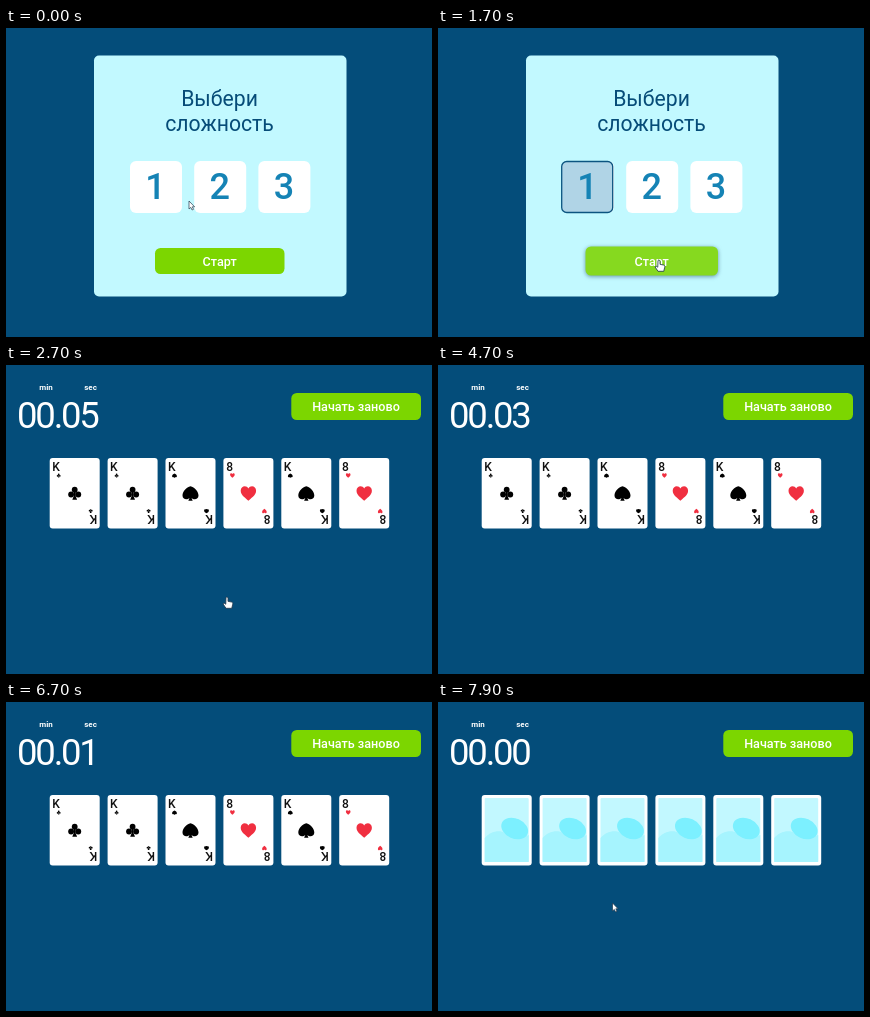
An HTML page that plays this animation: 426x309 px, repeating every 8 s.

```html
<!DOCTYPE html>
<html lang="ru">
<head>
<meta charset="utf-8">
<style>
  html, body { margin: 0; width: 100%; height: 100%; overflow: hidden; background: #044d7a; }
  svg { display: block; width: 100vw; height: 100vh; font-family: Roboto, "Noto Sans", sans-serif; }
  .mid { text-anchor: middle; }
  .num { font-size: 36px; font-weight: 500; fill: #1583b5; }
  .label { font-size: 12.6px; font-weight: 500; fill: #fff; }
  .unit { font-size: 8px; font-weight: 700; fill: #fff; }
  .rank { font-size: 12px; font-weight: 500; }
  .lift { filter: drop-shadow(0 1px 2px #24506e99); }
</style>
</head>
<body>
<svg viewBox="0 0 426 309" preserveAspectRatio="none">
  <defs>
    <path id="heart" d="M0 7.5C-2 5-7.7 2.2-7.7-2.6C-7.7-7.6-1.8-8.6 0-4.7C1.8-8.6 7.7-7.6 7.7-2.6C7.7 2.2 2 5 0 7.5Z" fill="#f02f40"/>
    <path id="spade" d="M0-7C4-5.8 8-2 8 2.2C8 6.4 3.2 7 1 4.6L2.2 7.4H-2.2L-1 4.6C-3.2 7-8 6.4-8 2.2C-8-2-4-5.8 0-7Z"/>
    <g id="club">
      <circle cy="-3.6" r="2.9"/><circle cx="-3.6" cy="1.2" r="2.9"/><circle cx="3.6" cy="1.2" r="2.9"/>
      <path d="M-1-3H1L1 3L2.4 6.4H-2.4L-1 3Z"/>
    </g>
    <g id="back">
      <rect width="50" height="70.5" rx="3" fill="#fff"/>
      <rect x="3" y="3" width="44" height="64" rx="1" fill="#c2f8ff"/>
      <path d="M3 43C8 37 17 34 24 38C31 44 39 44 47 40V67H3Z" fill="#a6f4fe"/>
      <ellipse cx="33" cy="33.5" rx="14" ry="10" transform="rotate(24 33 33.5)" fill="#7cf0ff"/>
    </g>
  </defs>

  <g id="menu">
    <rect x="88" y="27.5" width="252.5" height="241" rx="5" fill="#c2f9ff"/>
    <g class="mid" font-size="21.2" fill="#064c78">
      <text x="213.5" y="78">Выбери</text>
      <text x="213.5" y="103">сложность</text>
    </g>
    <g id="levels"></g>
    <rect id="start" rx="5.5"/>
    <text class="label mid" x="213.7" y="238">Старт</text>
  </g>

  <g id="game">
    <text class="unit mid" x="40" y="25">min</text>
    <text class="unit mid" x="84.5" y="25">sec</text>
    <text id="timer" x="11" y="62.5" font-size="36.5" letter-spacing="-2.2" fill="#fff"></text>
    <rect x="285.3" y="28" width="129.7" height="27" rx="5.5" fill="#7cd600"/>
    <text class="label mid" x="350" y="46">Начать заново</text>
    <g id="faces"></g>
    <g id="backs"></g>
  </g>

  <g id="cursor" fill="#fff" stroke="#23394d" stroke-width=".7" stroke-linejoin="round">
    <path id="arrow" d="M0 0V8L1.8 6.4L3.1 9L4.5 8.3L3.3 5.8H5.6Z"/>
    <path id="hand" transform="scale(1.2)" d="M0 0C.9-.8 1.7 0 1.7 1V3.2L4.7 3.8C5.6 4 5.8 4.7 5.6 5.6L4.8 9H0L-2.4 5.4C-2.2 4.4-1.2 4.6-.2 5.6Z"/>
  </g>
</svg>
<script>
// The picture advances in steps of STEP ms
const LOOP = 8000, STEP = 100, DEAL = 2700, LEAVE = 3700, HIDE = 7600, TURN = 7700;
const $ = id => document.getElementById(id);
const show = (id, on) => $(id).style.display = on ? '' : 'none';
const set = (el, attrs) => { for (const k in attrs) el.setAttribute(k, attrs[k]); };
const clamp = v => Math.max(0, Math.min(1, v));

$('levels').innerHTML = [1, 2, 3].map((n, i) => `
  <rect id="level${n}" x="${124 + 64.2 * i}" y="133" width="52" height="52" rx="6" fill="#fff"/>
  ${i ? '' : '<rect id="pick" fill="#b0d4e6" stroke="#0b5480" stroke-width="1.3"/>'}
  <text class="num mid" x="${149.5 + 64.2 * i}" y="171">${n}</text>`).join('');

const cardX = i => 43.7 + 57.9 * i;

function face([rank, suit], i) {
  const corner = `<text class="rank mid" x="-18.7" y="-22" fill="#111">${rank}</text>
    <use href="#${suit}" transform="translate(-16 -17.8) scale(.3)"/>`;
  return `<g transform="translate(${cardX(i) + 25} 128.3)">
    <rect x="-25" y="-35.3" width="50" height="70.5" rx="3" fill="#fff"/>
    <use href="#${suit}"/>${corner}<g transform="rotate(180)">${corner}</g></g>`;
}

const cards = [['K', 'club'], ['K', 'club'], ['K', 'spade'], ['8', 'heart'], ['K', 'spade'], ['8', 'heart']];
$('faces').innerHTML = cards.map(face).join('');
$('backs').innerHTML = cards.map((_, i) => `<use href="#back" x="${cardX(i)}" y="93"/>`).join('');

// Pointer stops: time, x, y
const path = [[0, 183, 173], [600, 164, 163], [1000, 164, 163], [1700, 220, 232.5], [LOOP, 220, 232.5]];

function pointer(t) {
  if (t >= TURN) return [174.5, 201];
  const i = path.findIndex(p => p[0] > t);
  const [t0, x0, y0] = path[i - 1], [t1, x1, y1] = path[i];
  const k = (t - t0) / (t1 - t0), e = k * k * (3 - 2 * k);
  return [x0 + (x1 - x0) * e, y0 + (y1 - y0) * e];
}

function draw(t) {
  const [x, y] = pointer(t), inMenu = t < DEAL;
  const onLevel = inMenu && x < 176 && y < 185;
  const onStart = inMenu && y > 220;

  show('menu', inMenu);
  show('game', !inMenu);
  show('faces', t < HIDE);
  show('backs', t >= TURN);

  const grow = onLevel ? 1.5 : 0;
  set($('level1'), {
    x: 124 - grow, y: 133 - grow, width: 52 + 2 * grow, height: 52 + 2 * grow,
    class: onLevel ? 'lift' : '', stroke: onLevel ? '#8fb6c8' : 'none'
  });

  const size = 51 * clamp((t - 800) / 146);
  show('pick', size > 0);
  set($('pick'), { x: 149.2 - size / 2, y: 159 - size / 2, width: size, height: size, rx: size / 10 });

  const g = onStart ? 1.5 : 0;
  set($('start'), {
    x: 149 - g, y: 220 - g, width: 129.5 + 2 * g, height: 26 + 2 * g,
    fill: onStart ? '#86d91f' : '#7cd600', class: onStart ? 'lift' : ''
  });

  const left = Math.max(0, Math.min(5, Math.ceil((7570 - t) / 975)));
  $('timer').textContent = '00.0' + left;

  const pointing = onLevel || onStart || (!inMenu && t < TURN);
  show('cursor', t < LEAVE || t >= TURN);
  show('hand', pointing);
  show('arrow', !pointing);
  set($('cursor'), { transform: `translate(${x} ${y})` });
}

function frame() {
  const t = performance.now() % LOOP;
  draw(t - t % STEP);
  requestAnimationFrame(frame);
}
frame();
</script>
</body>
</html>
```
